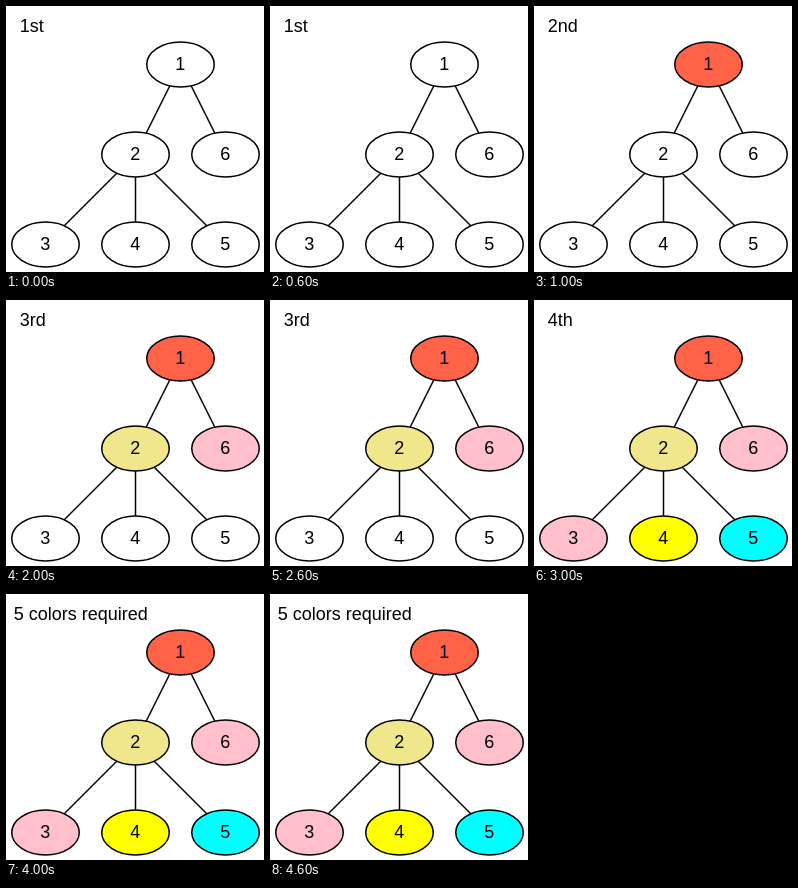
Recreate the animation shown at these times as an HTML page. Size 258 by 266 pixels, loop 5 s.

```html
<!DOCTYPE html>
<html lang="en">
<head>
<meta charset="utf-8">
<title>Tree colouring</title>
<style>
  html, body { margin: 0; width: 100%; height: 100%; overflow: hidden; background: #fff; }
  svg { display: block; }
  text { font: 18px "Liberation Sans", Arial, sans-serif; }
  ellipse, line { stroke: #000; stroke-width: 1.5; }
</style>
</head>
<body>
<svg id="stage" width="258" height="266" viewBox="0 0 258 266"></svg>
<script>
const STEP = 1000;
const captions = ["1st", "2nd", "3rd", "4th", "5 colors required"];

// Each node takes its color at the given step.
const nodes = [
  { x: 174.5, y: 58.5, color: "tomato", step: 1 },
  { x: 129.5, y: 148.5, color: "khaki", step: 2, parent: 0 },
  { x: 39.5, y: 238.5, color: "pink", step: 3, parent: 1 },
  { x: 129.5, y: 238.5, color: "yellow", step: 3, parent: 1 },
  { x: 219.5, y: 238.5, color: "cyan", step: 3, parent: 1 },
  { x: 219.5, y: 148.5, color: "pink", step: 2, parent: 0 }
];

const stage = document.getElementById("stage");

function add(tag, attributes, content = "") {
  const element = document.createElementNS("http://www.w3.org/2000/svg", tag);
  for (const [name, value] of Object.entries(attributes)) element.setAttribute(name, value);
  element.textContent = content;
  return stage.appendChild(element);
}

for (const { x, y, parent } of nodes) {
  if (parent === undefined) continue;
  add("line", { x1: nodes[parent].x, y1: nodes[parent].y, x2: x, y2: y });
}

nodes.forEach((node, i) => {
  node.shape = add("ellipse", { cx: node.x, cy: node.y, rx: 33.75, ry: 22.5 });
  add("text", { x: node.x - 0.3, y: node.y + 5.5, "text-anchor": "middle" }, i + 1);
});

const caption = add("text", { y: 26 });

function render(time) {
  const step = Math.floor(time / STEP) % captions.length;
  caption.textContent = captions[step];
  caption.setAttribute("x", step === captions.length - 1 ? 7.7 : 13.7);
  for (const node of nodes) {
    node.shape.setAttribute("fill", step >= node.step ? node.color : "white");
  }
}

const start = performance.now();
function tick() {
  render(performance.now() - start);
  requestAnimationFrame(tick);
}
tick();
</script>
</body>
</html>
```
